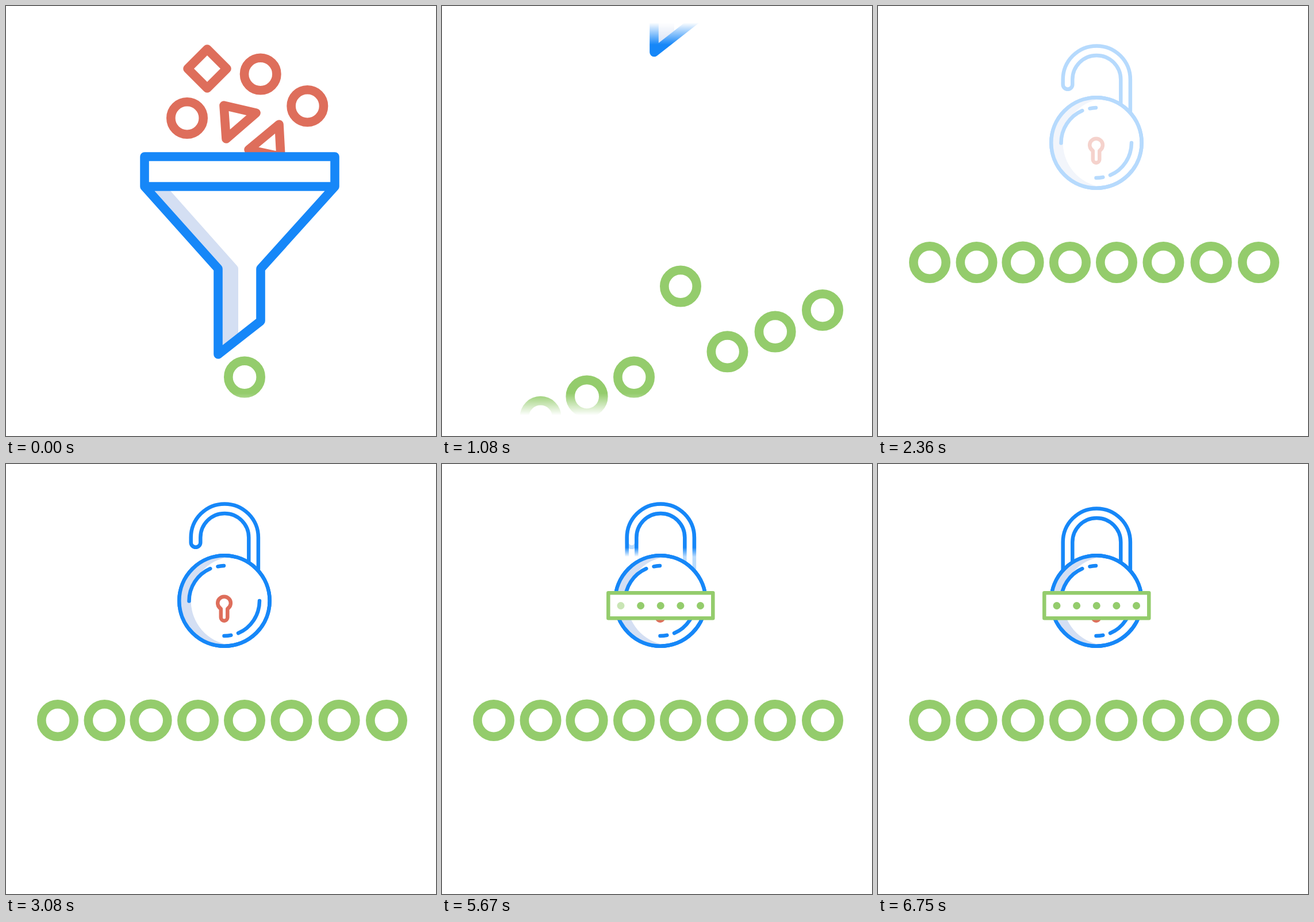
Animation, 748 px wide and 748 px high, one loop 6830 ms. Source, as an HTML page:

```html
<!DOCTYPE html>
<html lang="en">
<head>
<meta charset="utf-8">
<title>Filter and lock</title>
<style>
  html, body { margin: 0; height: 100%; overflow: hidden; background: #fff; }
  svg { display: block; width: 100vw; height: 100vh; fill: none; stroke-linecap: round; stroke-linejoin: round; }
  .red { stroke: #de6e5b; }
  .blue { stroke: #1687f8; }
  .green { stroke: #94cc6c; }
  .wide { stroke-width: 15.6; }
  .thin { stroke-width: 6.5; }
  .pale { fill: #d4dff3; }
  .white { fill: #fff; }
</style>
</head>
<body>
<svg viewBox="0 0 748 748">
  <defs>
    <linearGradient id="edges" gradientUnits="userSpaceOnUse" x1="0" y1="29" x2="0" y2="712">
      <stop offset="0" stop-color="#fff" stop-opacity="0"/>
      <stop offset=".056" stop-color="#fff"/>
      <stop offset=".944" stop-color="#fff"/>
      <stop offset="1" stop-color="#fff" stop-opacity="0"/>
    </linearGradient>
    <linearGradient id="wipe" gradientUnits="userSpaceOnUse" x1="0" x2="0" y1="50" y2="66">
      <stop offset="0" stop-color="#fff"/>
      <stop offset="1" stop-color="#fff" stop-opacity="0"/>
    </linearGradient>
    <mask id="edgeMask" maskUnits="userSpaceOnUse" x="0" y="0" width="748" height="748">
      <rect y="29" width="748" height="683" fill="url(#edges)"/>
    </mask>
    <mask id="wipeMask" maskUnits="userSpaceOnUse" x="0" y="0" width="748" height="748">
      <rect width="748" height="748" fill="url(#wipe)"/>
    </mask>
  </defs>

  <g mask="url(#edgeMask)">
    <g id="shapes" class="red wide">
      <path d="M350 75L384 109L350 143L316 109Z"/>
      <path d="M379 173L435 186L383 231Z"/>
      <path d="M475 206L478 262L422 250Z"/>
      <circle cx="442.7" cy="118.5" r="28.2"/>
      <circle cx="524.3" cy="174" r="28.2"/>
      <circle cx="315" cy="195" r="28.2"/>
    </g>
    <g id="funnel" class="blue wide">
      <path class="white" stroke="none" d="M241 262H572V314L443 457V548L369 606V457L241 314Z"/>
      <path class="pale" stroke="none" d="M245 316H281L402 452Q404 454 404 458V575L369 603V457Z"/>
      <path d="M241 262H572V314H241ZM241 314L369 457V606L443 548V457L572 314"/>
    </g>
    <g id="rings" class="green wide"></g>
  </g>

  <g id="lock" class="blue thin">
    <path id="open" d="M321.7 128A58.6 58.6 0 0 1 438.9 128V192M422.3 178V128A42 42 0 0 0 338.3 128V136.5A8.3 8.3 0 0 1 321.7 136.5V128"/>
    <g mask="url(#wipeMask)">
      <path id="closed" d="M321.7 192V128A58.6 58.6 0 0 1 438.9 128V192M338.3 178V128A42 42 0 0 1 422.3 128V178"/>
    </g>
    <circle class="white" cx="380" cy="238" r="78.7"/>
    <path class="pale" stroke="none" d="M388 161.4A77 77 0 1 0 388 314.6A77.4 77.4 0 0 1 388 161.4Z"/>
    <circle cx="380" cy="238" r="78.7"/>
    <path d="M318.5 238.5A61.3 61.3 0 0 1 355.3 182M368.5 178.3Q373 177.2 379 177M441 238A61.3 61.3 0 0 1 404 294.3M391.3 297.8Q386 299 379.5 299"/>
    <path class="red" d="M373.8 251.7V267a5.75 5.75 0 0 0 11.5 0V251.7A11.3 11.3 0 1 0 373.8 251.7Z"/>
  </g>

  <g id="banner">
    <rect class="green thin white" x="289.3" y="224.3" width="182" height="44"/>
    <g id="dots" fill="#94cc6c"></g>
  </g>
</svg>
<script>
const LOOP = 6830;
const $ = id => document.getElementById(id);
const clamp = v => Math.min(1, Math.max(0, v));
const part = (t, from, to) => clamp((t - from) / (to - from));
const moveY = (el, y) => el.setAttribute('transform', `translate(0 ${y})`);

function addCircle(parent, cx, cy, r) {
  const c = document.createElementNS('http://www.w3.org/2000/svg', 'circle');
  for (const [k, v] of Object.entries({ cx, cy, r })) c.setAttribute(k, v);
  return parent.appendChild(c);
}

function bezier(x1, y1, x2, y2) {
  const at = (a, b, s) => 3 * a * s * (1 - s) ** 2 + 3 * b * s * s * (1 - s) + s ** 3;
  return x => {
    let lo = 0, hi = 1;
    for (let i = 0; i < 30; i++) {
      const mid = (lo + hi) / 2;
      if (at(x1, x2, mid) < x) lo = mid; else hi = mid;
    }
    return at(y1, y2, (lo + hi) / 2);
  };
}
const scrollEase = bezier(.25, .1, .36, 1);
const ease = bezier(.25, .1, .25, 1);

// x position and distance below the final row
const rings = [[90, 1455], [171.5, 1289], [252, 1118], [334, 957],
               [415, 199.5], [496.5, 744], [579.6, 578], [662, 398]]
  .map(([x, drop], i) => ({ drop, el: addCircle($('rings'), x, 446, i === 2 ? 28.8 : 28.2) }));
const dots = [0, 1, 2, 3, 4].map(i => addCircle($('dots'), 311 + i * 34.63, 246.5, 6.5));

function draw(t) {
  const p = t < 80 ? 0 : scrollEase(part(t, 44, 1972));
  moveY($('shapes'), -790 * p);
  moveY($('funnel'), -664 * p);
  for (const { el, drop } of rings) moveY(el, drop * (1 - p));

  $('lock').style.opacity = part(t, 2040, 3080);
  $('banner').style.opacity = part(t, 4510, 4950);
  dots.forEach((dot, i) => {
    const start = 4950 + (4 - i) * 160;
    dot.style.opacity = part(t, start, start + 160);
  });

  const w = part(t, 5000, 5950);
  $('open').style.opacity = 1 - w;
  $('wipe').setAttribute('y1', 50 + 135 * w);
  $('wipe').setAttribute('y2', 66 + 135 * w);
  moveY($('closed'), 8 * ease(part(t, 5850, 6750)));
}

const begin = performance.now();
function tick() {
  draw((performance.now() - begin) % LOOP);
  requestAnimationFrame(tick);
}
tick();
</script>
</body>
</html>
```
